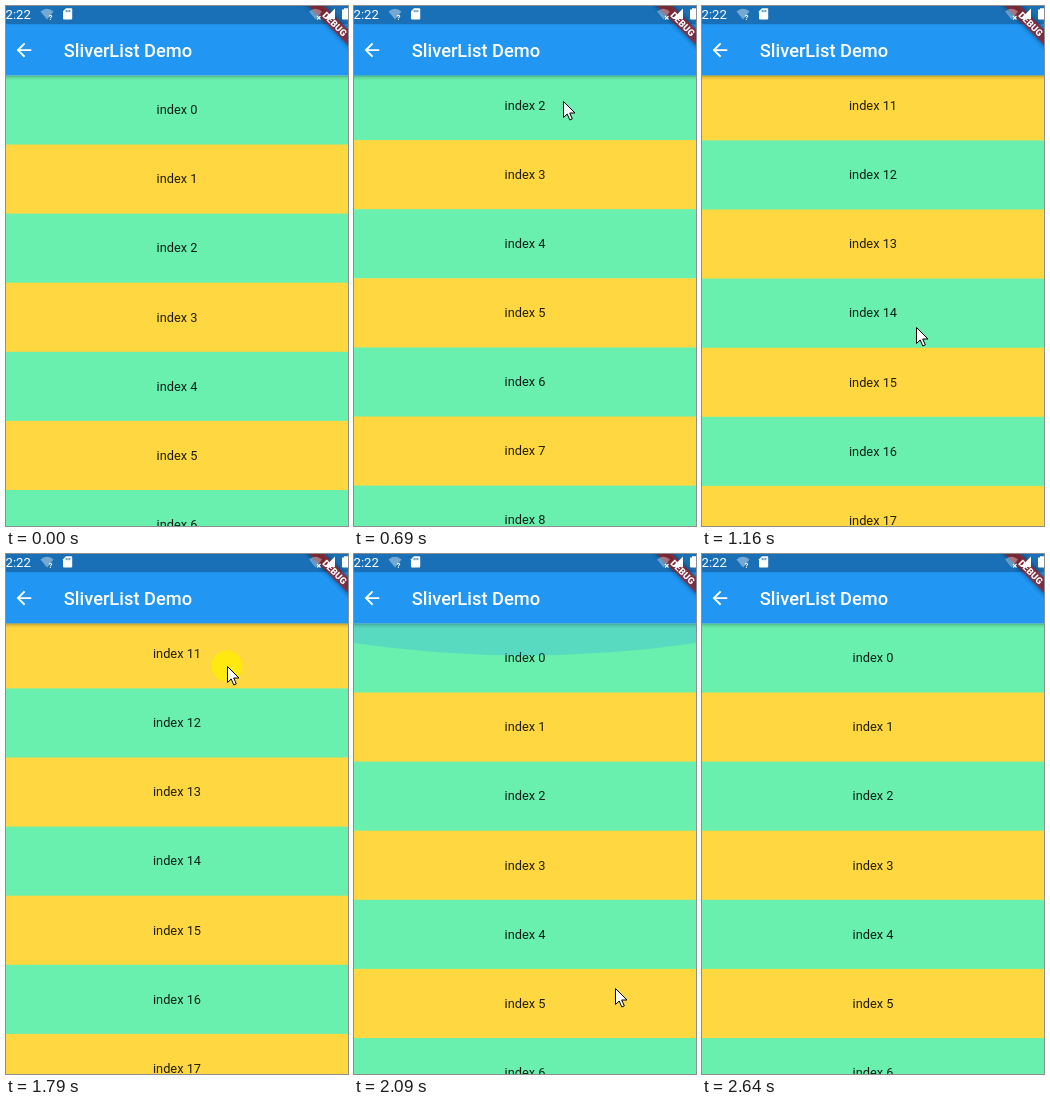
Recreate the animation shown at these times as an HTML page. Size 342 px wide and 520 px high, loop 3.65 s.

```html
<!DOCTYPE html>
<html lang="en">
<head>
<meta charset="utf-8">
<title>SliverList Demo</title>
<style>
  html, body { margin: 0; width: 100%; height: 100%; overflow: hidden; }
  svg { display: block; width: 342px; height: 520px; font-family: Roboto, sans-serif; }
</style>
</head>
<body>
<svg viewBox="0 0 342 520">
  <defs>
    <filter id="blur" x="-20%" y="-100%" width="140%" height="300%"><feGaussianBlur stdDeviation="2.4"/></filter>
    <linearGradient id="shade" x2="0" y2="1">
      <stop offset="0" stop-color="#000" stop-opacity=".3"/>
      <stop offset=".4" stop-color="#000" stop-opacity=".1"/>
      <stop offset="1" stop-color="#000" stop-opacity="0"/>
    </linearGradient>
    <path id="wifi" d="M0 3Q6.5-2.6 13 3L6.5 11Z"/>
  </defs>

  <g id="list" font-size="12.8" text-anchor="middle"></g>
  <path id="glow" fill="#2196f3"/>

  <!-- app bar -->
  <rect y="69.4" width="342" height="5" fill="url(#shade)"/>
  <rect width="342" height="69.4" fill="#2196f3"/>
  <rect width="342" height="18.2" fill="#1970b6"/>
  <path transform="translate(7 33.1) scale(.914)" fill="#fff"
    d="M20 11H7.83l5.59-5.59L12 4l-8 8 8 8 1.41-1.41L7.83 13H20v-2z"/>
  <text x="57.8" y="51" font-size="18.3" font-weight="500" fill="#fff">SliverList Demo</text>

  <!-- debug ribbon -->
  <g transform="translate(328.7 18) rotate(45)">
    <rect x="-40" y="-5.5" width="80" height="11" opacity=".5" filter="url(#blur)"/>
    <rect x="-40" y="-5.5" width="80" height="11" fill="#b71c1c" fill-opacity=".63"/>
    <text y="3.3" font-size="9.3" font-weight="900" text-anchor="middle" fill="#fff">DEBUG</text>
  </g>

  <!-- status icons -->
  <g fill="#fff">
    <text x="-.5" y="13" font-size="13.2">2:22</text>
    <use href="#wifi" x="34.5" y="2.5" opacity=".4"/>
    <text x="42.5" y="13.5" font-size="8" font-weight="700">?</text>
    <path d="M60 2.2h5.2q1 0 1 1v9.200q0 1-1 1h-7.200q-1 0-1-1V5.300z"/>
    <path d="M60.200 4v2.200M62 4v2.200M63.800 4v2.200" stroke="#1970b6" stroke-width=".9"/>
    <use href="#wifi" x="303" y="2.500" opacity=".35"/>
    <path d="M311 10l3.500 3.500m0-3.500l-3.500 3.500" stroke="#fff" stroke-width="1.100"/>
    <path d="M329 2.500V13H318.500z"/>
    <path d="M336 3.500h2V2.200h4V13.400h-5q-1 0-1-1z"/>
  </g>

  <circle id="press" r="15.500" fill="#ffee00" fill-opacity=".78"/>
  <path id="cursor" d="M.5.5V16.500L4.200 13l2.600 6 2.500-1.100L6.700 12H12z"
    fill="#fff" stroke="#000" stroke-linejoin="round"/>
</svg>
<script>
const LOOP = 3650, TOP = 69.4, ROW = 69.1;
const $ = id => document.getElementById(id);

const ticks = [0, 70, 150, 230, 310, 390, 470, 550, 610, 690, 780, 850, 930, 1010, 1080,
  1160, 1250, 1330, 1410, 1480, 1560, 1710, 1790, 1860, 1940, 2010, 2090, 2170,
  2250, 2330, 2410, 2490, 2560, 2640];

// Keys are [time, value, ...].
const scrollKeys = [[550, 0], [610, 25], [690, 142.6], [780, 560], [850, 756.5], [930, 762],
  [1010, 764.2], [1790, 764.2], [1860, 720], [1940, 430], [2010, 110], [2090, 0]];
const cursorKeys = [[70, 279, 485], [390, 253, 438], [550, 236, 409], [610, 224, 280],
  [690, 209, 95], [850, 209, 61], [930, 209, 65], [1010, 209, 110], [1080, 211, 210],
  [1160, 214, 321], [1250, 224, 340], [1330, 229, 290], [1480, 223, 165], [1560, 219, 131],
  [1790, 221, 112], [1860, 226, 180], [1940, 242, 310], [2010, 255, 400], [2090, 261, 434],
  [2170, 261, 436], [2560, 275, 521]];
const glowKeys = [[2010, 0], [2090, 1], [2170, .6], [2250, .2], [2330, 0]];

function sample(keys, t) {
  if (t <= keys[0][0]) return keys[0].slice(1);
  const i = keys.findIndex(k => k[0] >= t);
  if (i < 0) return keys[keys.length - 1].slice(1);
  const a = keys[i - 1], b = keys[i], p = (t - a[0]) / (b[0] - a[0]);
  return a.slice(1).map((v, n) => v + (b[n + 1] - v) * p);
}

function add(tag, parent, attrs) {
  const el = document.createElementNS("http://www.w3.org/2000/svg", tag);
  for (const k in attrs) el.setAttribute(k, attrs[k]);
  return parent.appendChild(el);
}

const rows = Array.from({ length: 8 }, () => {
  const g = add("g", $("list"), {});
  return {
    g,
    box: add("rect", g, { width: 342, height: ROW + .5 }),
    label: add("text", g, { x: 171, y: 38.9, fill: "#000", "fill-opacity": .87 })
  };
});

function show(el, on) { el.setAttribute("visibility", on ? "visible" : "hidden"); }
function move(el, x, y) { el.setAttribute("transform", `translate(${x} ${y})`); }

function draw(time) {
  const t = ticks.filter(k => k <= time).pop();

  const [scroll] = sample(scrollKeys, t);
  const first = Math.floor(scroll / ROW);
  rows.forEach((row, i) => {
    const n = first + i;
    move(row.g, 0, TOP + n * ROW - scroll);
    row.box.setAttribute("fill", n % 2 ? "#ffd740" : "#69f0ae");
    row.label.textContent = "index " + n;
  });

  const [glow] = sample(glowKeys, t);
  const depth = 32 * Math.sqrt(glow);
  const edge = TOP + depth * .61, pull = TOP + depth * 1.39;
  $("glow").setAttribute("d", `M0 ${TOP}V${edge}Q171 ${pull} 342 ${edge}V${TOP}Z`);
  $("glow").setAttribute("opacity", .25 * glow);

  const [x, y] = sample(cursorKeys, t);
  move($("cursor"), x, y);
  move($("press"), x, y);
  show($("cursor"), t >= 70 && t < 2560);
  show($("press"), (t >= 550 && t < 690) || (t >= 1560 && t < 2090));
}

const start = performance.now();
function frame() {
  draw((performance.now() - start) % LOOP);
  requestAnimationFrame(frame);
}
frame();
</script>
</body>
</html>
```
